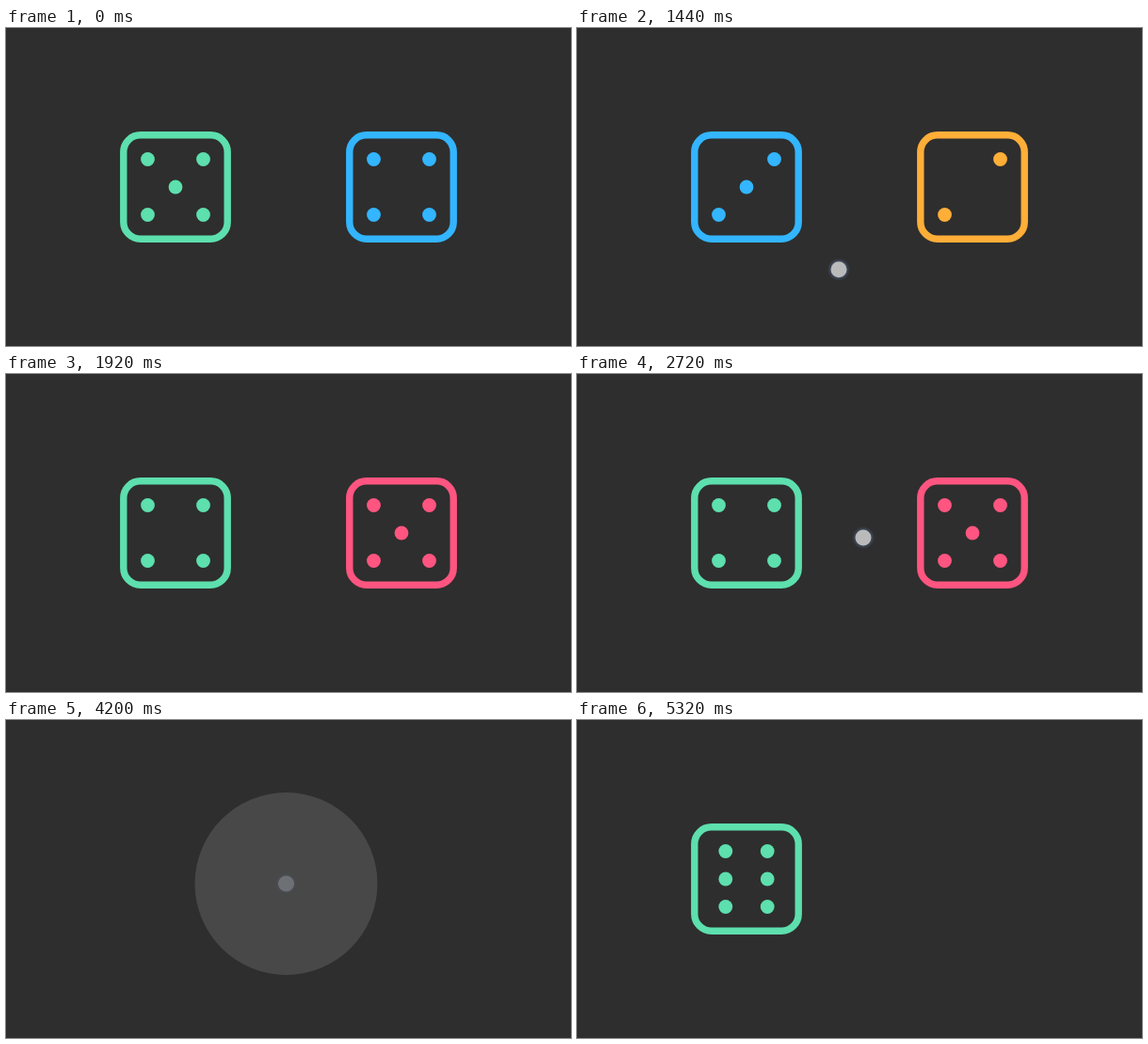
Animation of 600x338 px, one loop 5360 ms. Source, as an HTML page with a canvas:

```html
<!DOCTYPE html>
<html lang="en">
<head>
<meta charset="utf-8">
<title>Dice roll</title>
<style>
  html, body { margin: 0; width: 100%; height: 100%; overflow: hidden; background: #2e2e2e; }
  canvas { display: block; }
</style>
</head>
<body>
<canvas width="600" height="338"></canvas>
<script>
const ctx = document.querySelector('canvas').getContext('2d');
const LOOP = 5360, STEP = 40;
const GREEN = '#5ddfae', BLUE = '#33b5ff', RED = '#ff5580', ORANGE = '#ffae38';

// Each roll holds [colour, value] for the left and the right die.
const firstRoll = [[GREEN, 5], [BLUE, 4]];
const taps = [
  { down: 40, start: 200, up: 330, x: 285, y: 268, roll: [[BLUE, 3], [ORANGE, 2]] },
  { down: 1440, start: 1560, up: 1740, x: 278, y: 256.7, flash: true, roll: [[GREEN, 4], [RED, 5]] },
  { down: 2720, start: 2800, up: 2960, x: 304, y: 174, roll: [[RED, 1], [ORANGE, 5]] },
  { down: 4000, start: 4040, up: 4240, x: 297.5, y: 174, roll: [[BLUE, 6], [GREEN, 3]] },
  { down: 4960, start: 5000, up: 5180, x: 300, y: 167, roll: [[GREEN, 6], [BLUE, 2]] }
];

const clamp = v => Math.max(0, Math.min(1, v));

function disc(x, y, r, fill) {
  ctx.fillStyle = fill;
  ctx.beginPath();
  ctx.arc(x, y, r, 0, 2 * Math.PI);
  ctx.fill();
}

function pips(value) {
  const spots = value % 2 ? [[0, 0]] : [];
  const dx = value === 6 ? 22.2 : 29.5, dy = 29.5;
  if (value > 1) spots.push([dx, -dy], [-dx, dy]);
  if (value > 3) spots.push([-dx, -dy], [dx, dy]);
  if (value === 6) spots.push([-dx, 0], [dx, 0]);
  return spots;
}

function die(x, [colour, value]) {
  const y = 169;
  ctx.strokeStyle = colour;
  ctx.lineWidth = 7.4;
  ctx.beginPath();
  ctx.roundRect(x - 55.2, y - 55.2, 110.4, 110.4, 18);
  ctx.stroke();
  for (const [dx, dy] of pips(value)) disc(x + dx, y + dy, 7.4, colour);
}

function ripple({ x, y }, age) {
  if (age < 0) return;
  const radius = 116 - 90 * 0.46 ** (age / 80);
  const alpha = 0.178 * clamp((280 - age) / 130);
  disc(x, y, radius, `rgba(204,204,204,${alpha})`);
}

function touch({ x, y, up }, t) {
  const alpha = clamp((up - t) / 120);
  if (!alpha) return;
  const halo = ctx.createRadialGradient(x, y, 8, x, y, 12);
  halo.addColorStop(0, `rgba(75,90,120,${alpha * 0.7})`);
  halo.addColorStop(1, 'rgba(75,90,120,0)');
  disc(x, y, 12, halo);
  disc(x, y, 8.5, `rgba(186,186,186,${alpha})`);
}

function draw(t) {
  ctx.fillStyle = '#2e2e2e';
  ctx.fillRect(0, 0, 600, 338);

  const index = taps.findLastIndex(tap => t >= tap.down);
  const tap = taps[index];
  const before = index > 0 ? taps[index - 1].roll : firstRoll;
  const age = tap ? t - tap.start : -1;

  if (tap && tap.flash) {
    const alpha = 0.114 * clamp((age + 40) / 120) * clamp((280 - age) / 160);
    ctx.fillStyle = `rgba(204,204,204,${alpha})`;
    ctx.fillRect(0, 0, 600, 338);
  }
  if (tap) ripple(tap, age);

  // Old dice vanish together; the new ones return left first.
  [180, 420].forEach((x, side) => {
    if (age < 40) die(x, before[side]);
    else if (age >= 320 + side * 40) die(x, tap.roll[side]);
  });
  if (tap) touch(tap, t);
}

const origin = performance.now();
function tick() {
  const t = (performance.now() - origin) % LOOP;
  draw(Math.floor(t / STEP) * STEP);
  requestAnimationFrame(tick);
}
tick();
</script>
</body>
</html>
```
